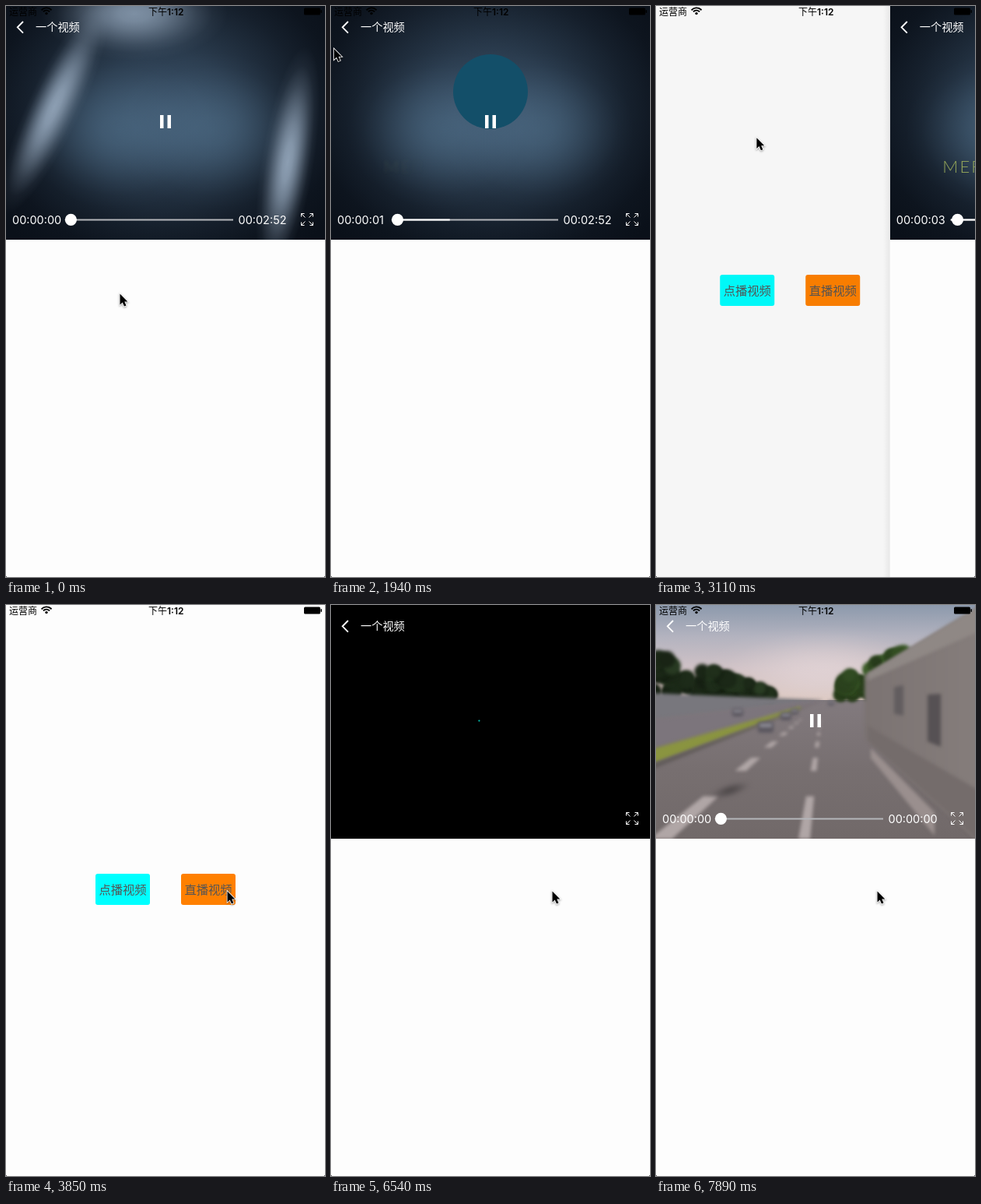
Write an HTML page with a canvas that moves like this. It is 410x733 px and loops after 8 s.

```html
<!DOCTYPE html>
<html lang="zh">
<head>
<meta charset="utf-8">
<title>Player</title>
<style>
html, body { margin: 0; width: 100%; height: 100%; overflow: hidden; background: #fdfdfd; }
canvas { display: block; width: 410px; height: 733px; }
</style>
</head>
<body>
<canvas id="stage"></canvas>
<script>
const W = 410, H = 733, VIDEO_H = 300, LOOP = 8000, STEP = 148.7;
const CJK = '"Noto Sans CJK SC", "Noto Sans CJK", sans-serif';
const LATIN = 'Inter, "Open Sans", sans-serif';
const PAPER = '#fdfdfd';
const canvas = document.getElementById('stage');
const dpr = window.devicePixelRatio || 1;
canvas.width = W * dpr;
canvas.height = H * dpr;
const c = canvas.getContext('2d');

const clamp = v => Math.max(0, Math.min(1, v));
const lerp = (a, b, p) => a + (b - a) * p;
const part = (t, from, to) => clamp((t - from) / (to - from));
const easeOut = p => 1 - (1 - p) ** 2;
const easeInOut = p => p * p * (3 - 2 * p);
const noise = n => Math.abs(Math.sin(n * 12.9898) * 43758.5453) % 1;

function rect(x, y, w, h, color) {
  c.fillStyle = color;
  c.fillRect(x, y, w, h);
}

function trace(points) {
  c.beginPath();
  for (const [x, y] of points) c.lineTo(x, y);
}

function poly(points, color) {
  trace(points);
  c.fillStyle = color;
  c.fill();
}

function line(points, color, width) {
  trace(points);
  c.strokeStyle = color;
  c.lineWidth = width;
  c.stroke();
}

function arc(x, y, r, from, to, color, width) {
  c.beginPath();
  c.arc(x, y, r, from, to);
  c.strokeStyle = color;
  c.lineWidth = width;
  c.stroke();
}

function disc(x, y, r, color) {
  c.beginPath();
  c.arc(x, y, r, 0, Math.PI * 2);
  c.fillStyle = color;
  c.fill();
}

function box(x, y, w, h, r, color) {
  c.beginPath();
  c.roundRect(x, y, w, h, r);
  c.fillStyle = color;
  c.fill();
}

function text(str, x, y, font, color, align = 'left') {
  c.font = font;
  c.fillStyle = color;
  c.textAlign = align;
  c.fillText(str, x, y);
}

function fade(x0, y0, x1, y1, colors) {
  const g = c.createLinearGradient(x0, y0, x1, y1);
  colors.forEach((s, i) => g.addColorStop(i / (colors.length - 1), s));
  return g;
}

// soft ellipse; rgb is "r,g,b"
function glow(x, y, rx, ry, turn, rgb, alpha) {
  c.save();
  c.translate(x, y);
  c.rotate(turn);
  c.scale(rx, ry);
  const g = c.createRadialGradient(0, 0, 0, 0, 0, 1);
  for (let i = 0; i <= 6; i++)
    g.addColorStop(i / 6, `rgba(${rgb},${alpha * (1 - easeInOut(i / 6))})`);
  c.fillStyle = g;
  c.fillRect(-1, -1, 2, 2);
  c.restore();
}

function statusBar() {
  text('运营商', 4, 12, '12px ' + CJK, '#000');
  for (const r of [8.6, 5.4]) arc(52, 11, r, -Math.PI * 0.77, -Math.PI * 0.23, '#000', 1.9);
  disc(52, 9.6, 1.7, '#000');
  text('下午', 183, 12, '500 12px ' + CJK, '#000');
  text('1:12', 207, 12, '600 12px ' + LATIN, '#000');
  box(383, 2.5, 21, 9, 1.5, '#000');
  box(404.5, 5, 1.5, 4, 0.7, '#000');
}

function button(label, x, color) {
  box(x, 345, 70, 40, 3, color);
  text(label, x + 35, 371, '15.3px ' + CJK, '#555', 'center');
}

function home(x, dim) {
  rect(0, 0, W, H, PAPER);
  button('点播视频', 115 + x, '#00ffff');
  button('直播视频', 225 + x, '#ff8000');
  rect(0, 0, W, H, `rgba(0,0,0,${dim})`);
}

function caption(t) {
  const chars = [...'MERON GRAND SCOUT'];
  const font = '300 22px Lato, sans-serif';
  c.font = font;
  c.textAlign = 'left';
  const widths = chars.map(ch => c.measureText(ch).width + (ch === ' ' ? 6 : 2.2));
  let x = 211 - widths.reduce((a, b) => a + b, 0) / 2;
  chars.forEach((ch, i) => {
    const a = part(t, 1800 + i * 50, 2600 + i * 50);
    if (a > 0) {
      c.save();
      c.globalAlpha = a;
      c.filter = a < 1 ? `blur(${(1 - a) * 2.5}px)` : 'none';
      text(ch, x, 214, font, '#96a85a');
      c.restore();
    }
    x += widths[i];
  });
}

function introVideo(t) {
  rect(0, 0, W, VIDEO_H, '#0a1019');
  glow(205, 135, 270, 225, 0, '62,86,110', 0.85);
  for (const side of [-1, 1]) glow(205 + side * 60, 160, 125, 100, 0, '88,122,150', 0.5);

  const light = 1 - part(t, 0, 520);
  glow(165, 10, 120, 60, 0, '125,143,163', light);
  for (const side of [-1, 1])
    glow(212 + side * 150, 165 + side * 35, 34, 150, 0.3 - side * 0.14, '140,158,178', light);

  const p = part(t, 0, 892);
  c.globalAlpha = p * p;
  disc(205, lerp(117, 110, part(t, 892, 1800)), lerp(230, 48, easeOut(p)), '#134f69');
  c.globalAlpha = 1;
  caption(t);
}

// the road scene converges on one vanishing point
const EYE = { x: 215, y: 122 };

// strip between the rays through (x, y1) and (x, y2), starting at x0
function wedge(x, y1, y2, color, x0 = EYE.x) {
  const q = (x0 - EYE.x) / (x - EYE.x);
  const near = y => [x, y], far = y => [x0, lerp(EYE.y, y, q)];
  poly([near(y1), near(y2), far(y2), far(y1)], color);
}

function dashes(slope, width, shift) {
  for (let n = 0; n < 7; n++) {
    const u = 0.0056 + n * 0.0054 + shift;
    const edge = (d, side) => [EYE.x - d * (slope + side * width), EYE.y + d];
    const near = 1 / u, far = 1 / (u + 0.0025);
    poly([edge(near, 1), edge(near, -1), edge(far, -1), edge(far, 1)], '#b0a6a6');
  }
}

function trees(x0, x1, top, rgb, seed) {
  for (let i = 0; i < 90; i++) {
    const p = noise(i + seed), depth = i / 90;
    const x = lerp(x0, x1, p), r = 7 + 5 * noise(i * 3 + seed);
    const shade = 0.5 + 0.6 * depth * noise(i * 5 + seed);
    const y = lerp(116, top(p) + r, depth);
    disc(x, y, Math.min(r, 124 - y), `rgb(${rgb.map(v => v * shade)})`);
  }
}

function car(x, y, w) {
  box(x - w / 2, y - w * 0.35, w, w * 0.7, 3, '#5b575f');
  rect(x - w * 0.4, y - w * 0.25, w * 0.8, w * 0.25, '#8b8a93');
}

function roadVideo(k) {
  const ago = 53 - (k < 52 ? Math.min(k, 50) : k);
  rect(0, 0, W, EYE.y, fade(0, 0, 0, EYE.y, ['#8c99ac', '#b3b3bf', '#d0c2c6', '#dcc7bd']));
  glow(215, 85, 150, 60, 0, '226,212,214', 0.8);
  rect(0, EYE.y, W, VIDEO_H - EYE.y, fade(0, EYE.y, 0, VIDEO_H, ['#827a7e', '#776f70', '#716969']));
  c.save();
  c.filter = 'blur(2px)';
  trees(-8, 148, p => lerp(54, 104, p ** 1.3), [42, 62, 36], 3);
  trees(236, 325, p => lerp(98, 48, Math.sqrt(p)), [76, 116, 52], 8);
  wedge(-5, 113, 147, '#78777d');
  wedge(-5, 147, 184, '#7c757c');
  wedge(-5, 185, 204, '#8a9440', 186);
  wedge(-5, 204, 211, '#615b5a');
  dashes(0.137, 0.042, ago * 0.0018);
  dashes(1.17, 0.08, ago * 0.0018);
  wedge(415, 2, 304, fade(268, 0, W, 0, ['#7b7372', '#857d7b']), 268);
  wedge(415, 2, 34, '#8f8885', 272);
  wedge(415, 238, 304, '#746c6b', 272);
  wedge(366, 114, 182, '#565154', 349);
  wedge(318, 103, 142, '#625d5f', 306);
  wedge(358, 266, 296, '#9a8f8e', 276);
  glow(95, 238, 30, 10, -0.3, '70,65,66', 0.8);
  car(141, 157, 20 - ago * 0.4);
  car(167, 143, 14);
  car(178, 137, 10);
  car(105, 138, 14);
  car(225, 126, 8);
  c.restore();
}

function header(arrow) {
  line([[22, 20], [14.8, 27.3], [22, 34.6]], arrow, 1.9);
  text('一个视频', 38, 32, '14.2px ' + CJK, '#fff');
}

function fullscreenIcon() {
  for (const sx of [-1, 1]) for (const sy of [-1, 1]) {
    const pt = (a, b) => [387 + sx * a, 274 + sy * b];
    line([pt(2.5, 2.5), pt(7.5, 7.5)], '#fff', 1);
    line([pt(3.5, 7.5), pt(7.5, 7.5), pt(7.5, 3.5)], '#fff', 1);
  }
}

function controls(now, total, knob, buffer) {
  const font = '14.5px ' + LATIN;
  rect(198, 140, 4.5, 17, '#fff');
  rect(207.5, 140, 4.5, 17, '#fff');
  text('00:00:' + String(now).padStart(2, '0'), 8, 280, font, '#fff');
  text(total, 298.5, 280, font, '#fff');
  rect(78, 273.5, 214, 2, '#b4b6ba');
  rect(78, 273.5, buffer, 2, '#fff');
  disc(knob, 274.3, 7.6, '#fff');
}

// a stroke that sweeps over a half circle, then back
function spinner(k) {
  const back = k >= 44;
  const p = back ? part(k, 44, 46) : part(k, 36, 40);
  const ends = [clamp(1.5 * p - 0.5), clamp(1.5 * p)].map(v => Math.PI * (back ? v - 1 : -v));
  const from = Math.min(...ends), to = Math.max(...ends), color = '#00c4b4';
  if (to - from < 0.01) disc(205.2 + 14.8 * Math.cos(to), 148.6, 1.1, color);
  else arc(205.2, 148.6, 14.8, from, to, color, 1.5);
}

function page(x, content) {
  c.save();
  c.translate(x, 0);
  rect(-9, 0, 9, H, fade(-9, 0, 0, 0, ['rgba(0,0,0,0)', 'rgba(0,0,0,.06)']));
  rect(0, 0, W, H, PAPER);
  c.beginPath();
  c.rect(0, 0, W, VIDEO_H);
  c.clip();
  content();
  c.restore();
}

function clipPage(t, k) {
  introVideo(t);
  const s = t / 1000;
  controls(Math.floor(s), '00:02:52', 83.4 + s * 1.08, 2 + 57 * s ** 0.37);
  header(k === 18 || k === 19 ? '#777b80' : '#fff');
  fullscreenIcon();
}

function livePage(k) {
  rect(0, 0, W, VIDEO_H, '#000');
  if (k >= 49) roadVideo(k);
  if (k >= 48) controls(0, '00:00:00', 83.4, 2);
  else spinner(k);
  header('#fff');
  if (k >= 35) fullscreenIcon();
}

function cursorAt(t) {
  const rise = easeInOut(part(t, 0, 892));
  const reach = part(t, 1200, 2379);
  const leave = easeOut(part(t, 2900, 3866));
  const x = 146 - 129 * rise + 5 * reach - 18 * Math.sin(Math.PI * reach) + 262 * leave;
  const y = 369 - 267 * rise - 70 * easeInOut(reach) + 335 * leave;
  return [x, y];
}

function cursor(t) {
  c.save();
  c.translate(...cursorAt(t));
  trace([[0.5, 0.5], [0.5, 14.4], [3.7, 11.4], [6, 16.6], [8.5, 15.5], [6.3, 10.5], [10.4, 10.5]]);
  c.closePath();
  c.shadowColor = 'rgba(0,0,0,.4)';
  c.shadowBlur = 2.5 * dpr;
  c.shadowOffsetY = dpr;
  c.lineWidth = 1.6;
  c.strokeStyle = '#fff';
  c.stroke();
  c.shadowColor = 'transparent';
  c.fillStyle = '#000';
  c.fill();
  c.restore();
}

// share of a page move still to go, ms after its start
const remaining = ms => ms < 0 ? 1 : ms > 600 ? 0 : Math.exp(-7.24 * ms / 1000);

function draw(time) {
  const k = Math.floor((time + 20) / STEP), t = k * STEP;
  const pushing = k >= 31;
  const away = pushing ? remaining(t - 4550) : 1 - remaining(t - 2940);
  c.setTransform(dpr, 0, 0, dpr, 0, 0);
  home(-0.3 * W * (1 - away), 0.1 * (1 - away));
  if (away < 1) page(W * away, () => pushing ? livePage(k) : clipPage(t, k));
  statusBar();
  cursor(t);
  for (const x of [0, W - 1]) rect(x, H - 1, 1, 1, '#555');
}

const start = performance.now();
function tick() {
  draw((performance.now() - start) % LOOP);
  requestAnimationFrame(tick);
}
tick();
</script>
</body>
</html>
```
